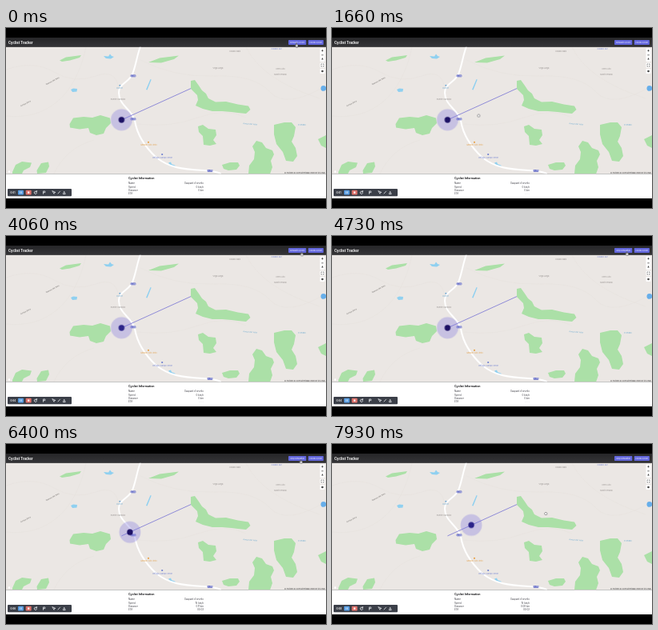
Write an HTML page that moves like this. It is 400x225 px and loops after 8000 ms.

```html
<!DOCTYPE html>
<html lang="en">
<head>
<meta charset="utf-8">
<title>Cyclist Tracker</title>
<style>
html, body { margin: 0; width: 100%; height: 100%; overflow: hidden; background: #000; }
svg { display: block; width: 100vw; height: 100vh; font-family: Inter, Arial, sans-serif; }
.land { fill: #ebe7e4; }
.wood { fill: #abe0a7; }
.water { fill: #8fd0f0; }
.track { fill: none; stroke: #e3deda; stroke-width: .4; }
.road { fill: none; stroke: #fff; stroke-width: 2; stroke-linecap: round; }
.label text { font-size: 2.4px; fill: #96918f; text-anchor: middle; }
.label .blue { fill: #7a88d2; }
.label .sea { fill: #72acd0; }
.label .orange { fill: #e2a14c; }
.label .dark { fill: #625e5c; }
.shield rect { fill: #555dc0; }
.shield text { font-size: 2px; font-weight: 700; fill: #fff; text-anchor: middle; }
.btn { fill: #6367de; }
.caption { font-size: 2.4px; font-weight: 500; fill: #e6e6fa; text-anchor: middle; }
.row { font-size: 2.9px; fill: #3f3f46; }
.value { text-anchor: end; }
.icon { fill: none; stroke: #e4e6ea; stroke-width: .8; stroke-linecap: round; stroke-linejoin: round; }
.tool { fill: none; stroke: #333; stroke-width: .7; }
.hand { fill: #fff; stroke: #26262b; stroke-width: .5; stroke-linejoin: round; }

.rider, .dot, .popup, .point, .grab { animation: 8s step-end infinite; }
.rider { animation-name: ride; }
.dot { animation-name: dim; }
.popup { animation-name: popup; }
.point { animation-name: point; }
.grab { animation-name: grab; }
.cursor { animation: move 8s linear infinite; }

@keyframes ride {
  0% { transform: translate(144.4px, 114.8px); }
  70% { transform: translate(154.9px, 110.2px); }
  81.25% { transform: translate(164.7px, 105.7px); }
  92.5%, 100% { transform: translate(174.1px, 101.3px); }
}
@keyframes dim {
  0% { fill: #1c1065; }
  40% { fill: #2b2389; }
  56% { fill: #1c1065; }
  66.6% { fill: #2b2389; }
  70% { fill: #1c1065; }
  96.7%, 100% { fill: #2b2389; }
}
@keyframes popup {
  0% { opacity: 0; }
  32% { opacity: 1; }
  40%, 100% { opacity: 0; }
}
@keyframes point {
  0% { opacity: 1; }
  14% { opacity: 0; }
  36.5% { opacity: 1; }
  41% { opacity: 0; }
  50% { opacity: 1; }
  81.5%, 100% { opacity: 0; }
}
@keyframes grab {
  0% { opacity: 0; }
  14% { opacity: 1; }
  36.5% { opacity: 0; }
  41% { opacity: 1; }
  50% { opacity: 0; }
  81.5%, 100% { opacity: 1; }
}
@keyframes move {
  0%, 13.25% { transform: translate(363px, 20.5px); }
  20.75% { transform: translate(183.5px, 109.5px); }
  23.25%, 35% { transform: translate(155px, 116px); }
  38.25%, 40% { transform: translate(145.2px, 116px); }
  43.25%, 45% { transform: translate(274px, 81px); }
  50.75% { transform: translate(369.5px, 21.5px); }
  55.75%, 80.75% { transform: translate(368.5px, 21px); }
  87.5% { transform: translate(287.5px, 77.5px); }
  90.75%, 100% { transform: translate(267.3px, 87px); }
}
</style>
</head>
<body>
<svg viewBox="0 0 400 225" preserveAspectRatio="none">
  <defs>
    <linearGradient id="bar" x2="0" y2="1">
      <stop offset="0" stop-color="#262628"/>
      <stop offset="1" stop-color="#343437"/>
    </linearGradient>
    <clipPath id="view"><rect y="23.5" width="400" height="158.8"/></clipPath>
  </defs>
  <rect width="400" height="225"/>

  <g clip-path="url(#view)">
    <rect class="land" y="23" width="400" height="160"/>
    <path class="track" d="M0 52Q35 40 60 55T112 60 141 78M60 182Q75 150 110 140M168 40Q210 62 260 60T330 80 400 72M165 120Q205 125 240 112T300 112M300 24Q320 65 392 88M100 24Q90 70 64 92T0 110"/>
    <g class="wood">
      <path d="M79.500 120L84 112.500 97 111 108 112 118 109 130 112.500 131 119 125 125 122 132 113 134 105 131 103 125 92 126.500 80 124.500Z"/>
      <path d="M38.500 178L44 169 53 167.500 54 173 50 181 39 182Z"/>
      <path d="M8 180L12 171 20 167 32 168.500 30 174 22 178 20 182 8 182Z"/>
      <path d="M231 66L236 65 241 72 245 78 250 82 253 88 262 92.500 275 92 290 95.500 303 97.500 305.500 102 300 107 290 106 282 105 270 104 258 104 246 101 237 97 240 90 239 84 231 76Z"/>
      <path d="M240 123L246 121 253 126 262 127 263 134 259 140 263 145 255 147 247 146 246 135 241 130Z"/>
      <path d="M335 121L348 118 357 118 362 124 360 135 357 142 362 150 364 160 359 167 350 166 346 155 338 145 335 133Z"/>
      <path d="M303 182.500L304 172 310 164 311 155 308 148 313 141 320 143 325 150 333 153 335 158 331 166 333 174 330 182.500Z"/>
      <path d="M270 171L280 168 290 168 292 172 288 177 278 178 272 176Z"/>
      <path d="M390 139L400 134V150L394 147Z"/>
      <path d="M67 40.500L75 36.500 94 34 92 37 80 40.500 70 42ZM178 43L192 37.500 216 34.500 210 39 194 43.500Z"/>
    </g>
    <path class="water" d="M81 77L84 75.500 89 76 88.500 79.500 83 80ZM122 35L128 35.500 130 32.500 132 35 135 36 131 38.500 125 38ZM175 77L180.500 64 181.700 64.500 176.500 77.500ZM203 168.500L206 167.500 207 170 212 172 210 174 205 171.500Z"/>
    <path class="road" d="M168 23C164 34 163 43 159 55 156 68 141 68 141 81 141 97 158 102 161 116 164 134 174 149 188 162 205 175 220 176.500 246 178 256 178.500 262 179 268 182"/>
    <g class="label">
      <text x="142" y="75.800" class="sea">Fuente</text>
      <text x="140" y="90">Puente Campillo</text>
      <text x="178.500" y="147" class="orange">Mirador Alto Viejo</text>
      <text x="195.500" y="162.500" class="blue">Refugio Campo Verde</text>
      <text class="dark" transform="translate(58.500 67) rotate(-28)">Camino del Soto</text>
      <text class="dark" transform="translate(25 95) rotate(-27)">Arroyo Seco</text>
      <text x="338" y="27" class="blue">Collado Sur</text>
      <text x="286" y="30">Collado Bajo</text>
      <text x="265" y="51">Vega Larga</text>
      <text x="343" y="51.500">Cerro Alto</text>
      <text x="343" y="59">Monte Pelado</text>
      <text class="sea" transform="translate(305 120.800) rotate(5)">Arroyo del Valle</text>
      <text class="sea" x="370" y="121.500">El Prado</text>
    </g>
    <circle cx="142.300" cy="71.800" r="1" fill="#72a9d4"/>
    <circle cx="178" cy="142.800" r="1.100" fill="#e8a24a"/>
    <circle cx="195.200" cy="158" r="1.100" fill="#6c7dd0"/>
    <circle cx="4" cy="179.500" r="1.200" fill="#fff"/>
    <g class="shield" id="shields"></g>
    <text x="399" y="181.600" font-size="2.300" fill="#444" text-anchor="end">© Plotwell © OpenStreetMap Improve this map</text>

    <path d="M144.400 114.900L231 75.600" stroke="#7773d3" stroke-width=".8" fill="none"/>
    <g class="rider">
      <circle r="13.400" fill="#8079e0" fill-opacity=".34"/>
      <circle class="dot" r="3.700"/>
    </g>
    <g class="popup">
      <path d="M134 100H155Q156 100 156 101V112Q156 113 155 113H146.500L144.500 115 142.500 113H134Q133 113 133 112V101Q133 100 134 100Z" fill="#fff"/>
      <text x="144.500" y="105.300" font-size="2.700" font-weight="700" text-anchor="middle">Cyclist</text>
      <text x="144.500" y="109.500" font-size="2.400" fill="#333" text-anchor="middle">Gaspard d'orvel</text>
    </g>

    <g fill="#fff">
      <rect x="392.500" y="25.500" width="6" height="16.500" rx=".8"/>
      <rect x="392.500" y="43.500" width="6" height="6" rx=".8"/>
      <rect x="392.500" y="51" width="6" height="6" rx=".8"/>
    </g>
    <path class="tool" d="M394.300 28.300H396.700M395.500 27.100V29.500M394.300 33.800H396.700M394 45.800V45H394.800M396.200 45H397V45.800M397 47.200V48H396.200M394.800 48H394V47.200"/>
    <path d="M395.500 37L396.700 39.500H394.300Z" fill="#444"/>
    <circle cx="395.500" cy="54" r="1.300" fill="#444"/>
    <circle cx="396.900" cy="75.400" r="3.400" fill="#66aeea"/>
  </g>

  <rect y="12" width="400" height="11.600" fill="url(#bar)"/>
  <text x="3" y="19.500" font-size="4.200" font-weight="700" fill="#fff">Cyclist Tracker</text>
  <rect class="btn" x="353" y="15" width="22.300" height="6" rx=".8"/>
  <rect class="btn" x="377.700" y="15" width="19.200" height="6" rx=".8"/>
  <text class="caption" x="364.150" y="18.900" id="action">Simulate Cyclist</text>
  <text class="caption" x="387.300" y="18.900">Follow Cyclist</text>

  <rect y="182.300" width="400" height="30.700" fill="#fff"/>
  <text x="153" y="189.200" font-size="3.500" font-weight="700" fill="#18181b">Cyclist Information</text>
  <g class="row">
    <text x="153" y="195">Name</text><text class="value" x="247" y="195">Gaspard d'orvelio</text>
    <text x="153" y="199.500">Speed</text><text class="value" x="247" y="199.500" id="speed">0 km/h</text>
    <text x="153" y="203.800">Distance</text><text class="value" x="247" y="203.800" id="dist">0 km</text>
    <text x="153" y="208.100">ETA</text><text class="value" x="247" y="208.100" id="eta">--:--</text>
  </g>

  <rect x="2" y="201" width="80" height="9.300" rx="1" fill="#3b3f48"/>
  <text x="5.500" y="206.600" font-size="2.800" font-weight="700" fill="#fff" id="clock">0:01</text>
  <rect x="15" y="202.700" width="7" height="5.800" rx="1" fill="#569be0"/>
  <rect x="24.700" y="202.700" width="7" height="5.800" rx="1" fill="#df716a"/>
  <path d="M17.700 204.300V206.900M19.400 204.300V206.900" stroke="#fff" stroke-width=".7"/>
  <rect x="27.100" y="204.500" width="2.200" height="2.200" fill="#fff"/>
  <path class="icon" d="M38.300 204.700A1.700 1.700 0 1 0 38.500 206.500M38.500 203.500V205H37M46.500 207.300V204H48.800V205.700H46.500M58 204L60 207.300 60.300 205.600 61.500 205.500ZM65 207L67.500 204.200M71.500 207.200L72.700 204.300 74 207.200Z"/>

  <g class="cursor">
    <path class="hand point" d="M-.5 -1.500Q0 -2.200 .5 -1.500V.2L2 .8Q2.300 2 1.500 3.200H-.5L-1.900 1.200 -1.300 .8 -.5 1.300Z"/>
    <path class="hand grab" d="M-1.300 -.8L-.7 -1.400 0 -1.600 .7 -1.400 1.400 -.8 1.500 .6 .9 1.700H-.7L-1.500 .6Z"/>
  </g>
</svg>
<script>
const LOOP = 8000, CLICK = 4500;
const stops = [
  [0, '0 km/h', '0 km', '--:--'],
  [5600, '15 km/h', '0.11 km', '00:03'],
  [6500, '15 km/h', '0.10 km', '00:02'],
  [7400, '15 km/h', '0.09 km', '00:02']
];
const el = id => document.getElementById(id);
const put = (id, text) => { if (el(id).textContent !== text) el(id).textContent = text; };

el('shields').innerHTML = [[159, 59.8], [159, 113.8], [255, 178.3]].map(([x, y]) =>
  `<rect x="${x - 3.3}" y="${y - 1.4}" width="6.6" height="2.8" rx=".6"/>` +
  `<text x="${x}" y="${y + .75}">A-315</text>`).join('');

const start = performance.now();
function tick(now) {
  const t = Math.max(0, now - start) % LOOP;
  const [, speed, dist, eta] = stops.filter(s => s[0] <= t).pop();
  put('speed', speed);
  put('dist', dist);
  put('eta', eta);
  el('eta').style.fill = t < 5600 ? '#c9c9cd' : '';
  put('action', t < CLICK ? 'Simulate Cyclist' : 'Stop Simulation');
  put('clock', '0:0' + Math.max(1, Math.floor((t + 250) / 1000)));
  requestAnimationFrame(tick);
}
requestAnimationFrame(tick);
</script>
</body>
</html>
```
